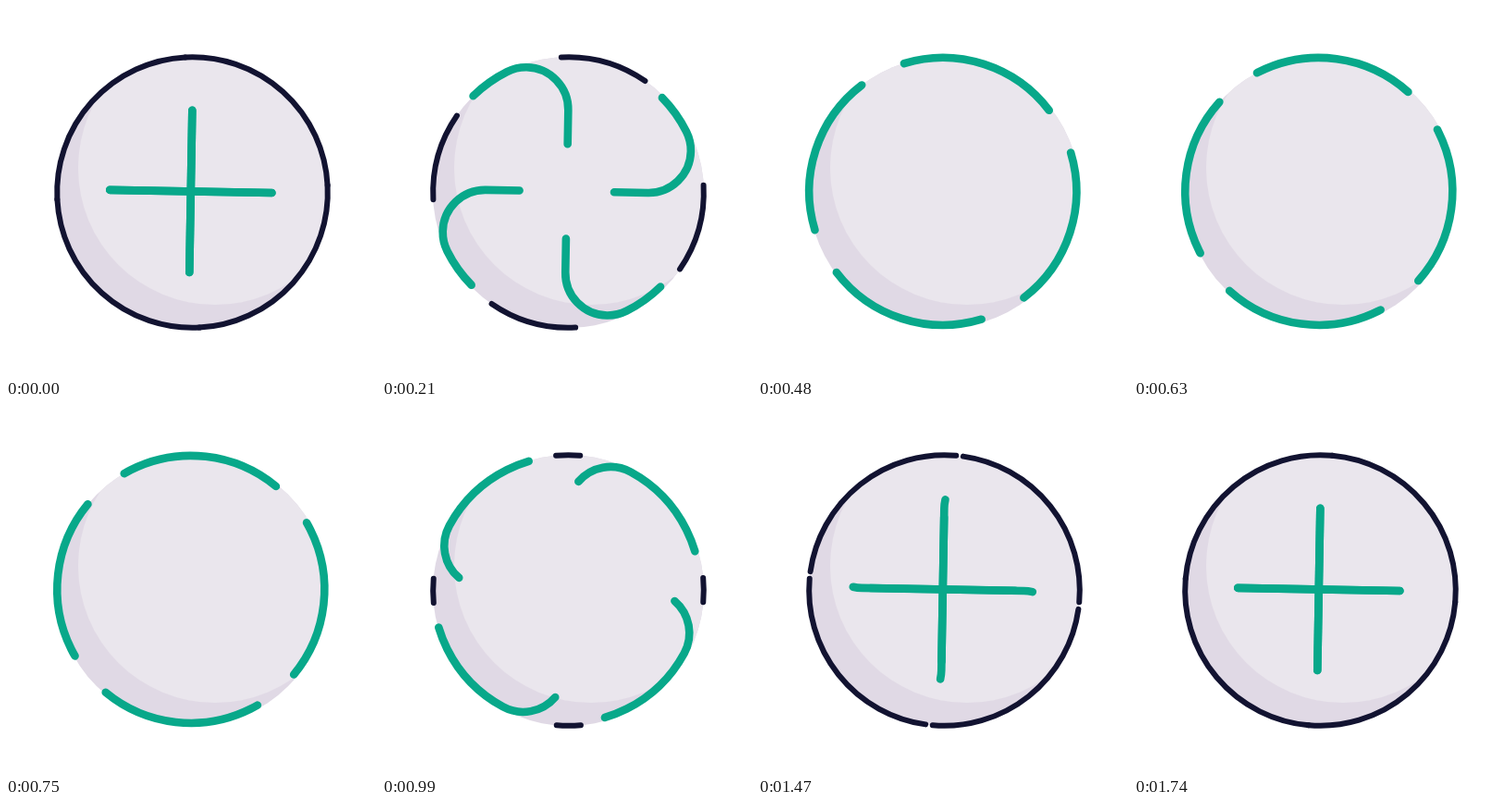
An HTML page with a canvas that plays this animation: 400x400 px, repeating every 3.86 s.

```html
<!DOCTYPE html>
<html lang="en">
<head>
<meta charset="utf-8">
<title>Plus to ring</title>
<style>
  html, body { margin: 0; width: 100%; height: 100%; overflow: hidden; background: #fff; }
  canvas { display: block; width: 400px; height: 400px; }
</style>
</head>
<body>
<canvas id="stage" width="400" height="400"></canvas>
<script>
const ctx = document.getElementById('stage').getContext('2d');
const LOOP = 3860;
const { PI, min, max, hypot, atan2 } = Math;
const DEG = PI / 180;

// Green strokes: straight bar, bend onto the ring, bend back to the bar.
const HALF = 87.6;
const RING = 144.5;
const BEND = (RING * RING - HALF * HALF) / (2 * RING);
const JOIN = atan2(BEND, HALF);
const BAR = 2 * HALF;
const TRAVEL = BAR + 2 * BEND * (PI / 2 + JOIN) + RING * (PI - 2 * JOIN);
const PAUSE = 329;

const clamp = (v, lo, hi) => max(lo, min(hi, v));

// cubic-bezier(.25, .1, .25, 1)
function ease(x) {
  if (x <= 0) return 0;
  if (x >= 1) return 1;
  const curve = (p, q, u) => 3 * p * u * (1 - u) ** 2 + 3 * q * u * u * (1 - u) + u ** 3;
  let lo = 0, hi = 1;
  for (let i = 0; i < 24; i++) {
    const mid = (lo + hi) / 2;
    if (curve(0.25, 0.25, mid) < x) lo = mid; else hi = mid;
  }
  return curve(0.1, 1, lo);
}

const span = (t, from, to) => ease((t - from) / (to - from));

function travelled(t) {
  return PAUSE * span(t, 22, 760) + (TRAVEL - PAUSE) * span(t, 768, 1665);
}

function disc(x, y, r, color) {
  ctx.fillStyle = color;
  ctx.beginPath();
  ctx.arc(x, y, r, 0, 2 * PI);
  ctx.fill();
}

function quarters(x, y, tilt, draw) {
  for (let k = 0; k < 4; k++) {
    ctx.save();
    ctx.translate(x, y);
    ctx.rotate(tilt + k * PI / 2);
    draw();
    ctx.restore();
  }
}

function drawButton() {
  ctx.save();
  ctx.beginPath();
  ctx.arc(201.5, 201.5, 146.5, 0, 2 * PI);
  ctx.clip();
  disc(201.5, 201.5, 148, '#e0d9e5');
  disc(226, 175, 148, '#eae6ed');
  ctx.restore();
}

function drawOutline(d) {
  let from, to;
  if (d < PAUSE) {
    from = -3;
    to = from + 90 - d * 0.378;
  } else {
    to = 5;
    from = to - clamp((d - 444) * 0.389, 0, 90);
  }
  if (to - from < 0.05) return;
  ctx.strokeStyle = '#121331';
  ctx.lineWidth = 6;
  quarters(201.5, 201.5, -PI / 2, () => {
    ctx.beginPath();
    ctx.arc(0, 0, 146.3, from * DEG, to * DEG);
    ctx.stroke();
  });
}

function drawStrokes(d) {
  ctx.strokeStyle = '#08a88a';
  ctx.lineWidth = 8.6;
  quarters(199.8, 200.4, DEG, () => {
    const leave = -PI / 2 - JOIN;
    const enter = -1.5 * PI + JOIN;
    ctx.setLineDash([BAR, 3000]);
    ctx.lineDashOffset = -d;
    ctx.beginPath();
    ctx.moveTo(0, HALF);
    ctx.lineTo(0, -HALF);
    ctx.arc(-BEND, -HALF, BEND, 0, leave, true);
    ctx.arc(0, 0, RING, leave, enter, true);
    ctx.arc(-BEND, HALF, BEND, enter, -2 * PI, true);
    ctx.lineTo(0, -HALF);
    ctx.stroke();
  });
}

function render(t) {
  // At rest the bar is drawn from its starting place.
  const d = travelled(t);
  ctx.fillStyle = '#fff';
  ctx.fillRect(0, 0, 400, 400);
  ctx.lineCap = 'round';
  ctx.lineJoin = 'round';
  drawButton();
  drawOutline(d);
  drawStrokes(d >= TRAVEL - 0.01 ? 0 : d);
}

const start = performance.now();
function tick() {
  render((performance.now() - start) % LOOP);
  requestAnimationFrame(tick);
}
tick();
</script>
</body>
</html>
```
